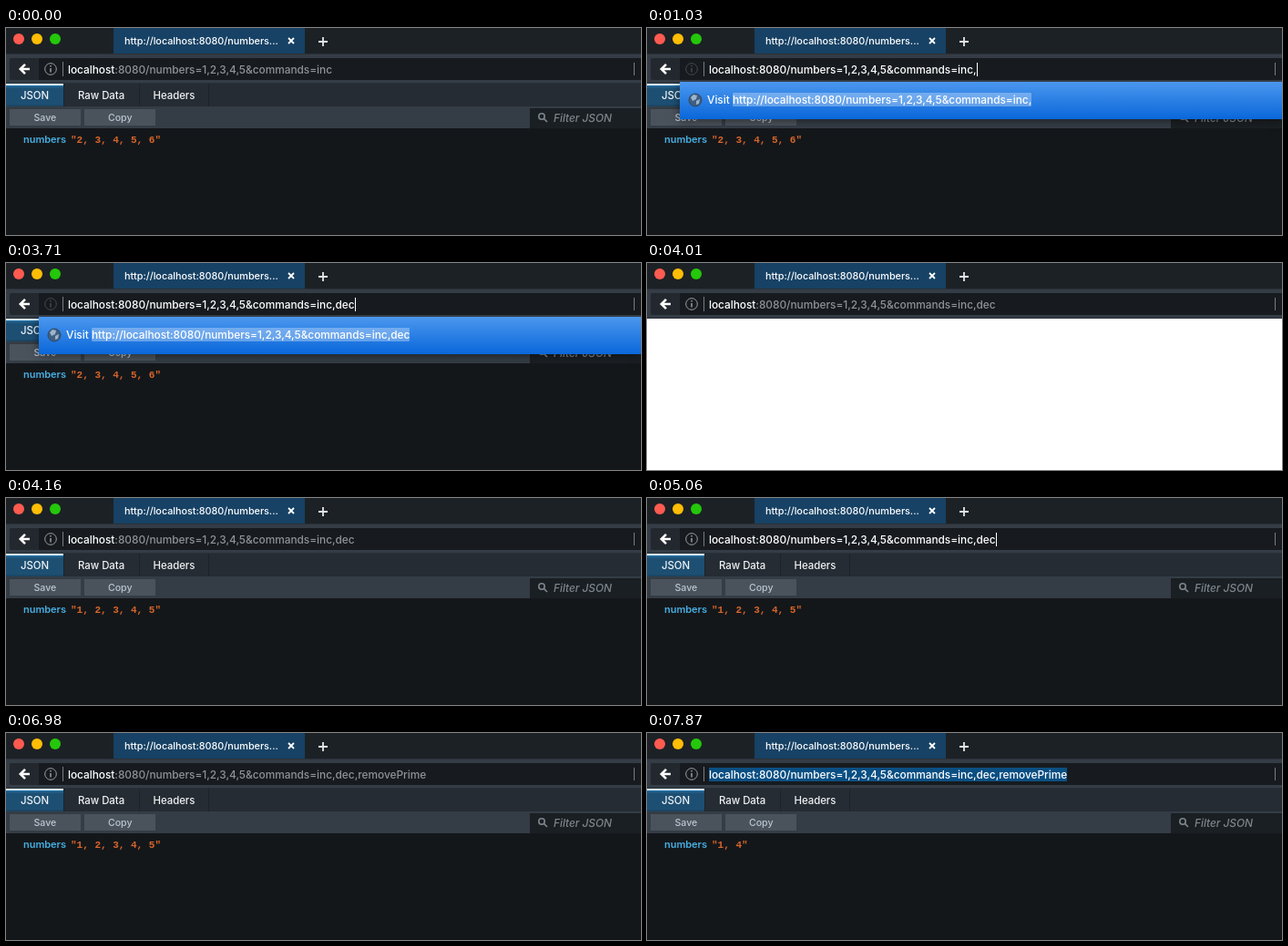
These frames come from a looping animation (697x227 px, 8 s). An HTML page:

```html
<!DOCTYPE html>
<html lang="en">
<head>
<meta charset="utf-8">
<title>Browser JSON viewer</title>
<style>
html, body { margin: 0; width: 100%; height: 100%; overflow: hidden; background: #14171a; }
body { position: relative; font: 500 11.88px/15px Inter, Roboto, sans-serif; letter-spacing: -.03px; font-variant-ligatures: none; color: #fff; }
p, div, svg { position: absolute; margin: 0; white-space: pre; }
svg { left: 0; top: 0; }

#tab { left: 118px; top: 0; width: 210px; height: 28px; background: #174265; }
#title { left: 130px; top: 7px; font-size: 10.85px; }
#titlebar { left: 0; top: 0; width: 100%; height: 28px; background: #1c2125; }
#nav { left: 0; top: 28px; width: 100%; height: 33px; background: #343c45; box-shadow: inset 0 1px #2a3037, inset 0 -1px #2a3037; }
#field { left: 36px; top: 33px; right: 0; height: 24px; background: #171b1f; }
#back { left: 4px; top: 33px; width: 32px; height: 24px; background: #22282e; border-radius: 2px 0 0 2px; }

#url { left: 68px; top: 38px; }
.idle #rest, .blank #rest { color: #8e9398; }
.selected #url span { background: #0a4f83; }
#caret { display: none; width: 1px; height: 15px; background: #fff; left: 100%; top: 0; }
.focus #caret, .typing #caret { display: block; }
.typing #info { opacity: .35; }

#tabs { left: 0; top: 61px; width: 100%; height: 25px; background: #252c33; }
#active { left: 0; top: 61px; width: 63px; height: 25px; background: #1d4f73;
  box-shadow: inset 0 2px #d7f1ff, inset 0 8px 3px -5px #2b82bf, inset 0 -2px rgba(0, 0, 0, .1); }
.menu { top: 67px; font-size: 11.4px; color: #f0f2f4; }
.line { top: 61px; width: 1px; height: 25px; background: #1d2329; }
#tools { left: 0; top: 86px; width: 100%; height: 24px; background: #343c45; }
.button { top: 89px; width: 78px; height: 18px; background: #4a525b; }
.label { top: 91px; font-size: 10.6px; color: #b9c6d2; }
#filter { left: 575px; top: 88px; right: 0; height: 22px; background: #1a1f23; }
#hint { left: 601px; top: 91px; font-style: italic; color: #7d858c; }
#key { left: 19px; top: 115px; font-size: 11px; font-weight: 600; color: #46afe3; }
#value { left: 71px; top: 116px; font: bold 11px/15px "Liberation Mono", monospace; letter-spacing: 0; color: #d96629; }
#blank { display: none; left: 0; top: 61px; width: 100%; bottom: 0; background: #fff; }
.blank #blank { display: block; }

#popup { display: none; left: 36px; top: 59px; right: 0; height: 41px; background: linear-gradient(#4b97ee, #0a67da);
  box-shadow: 0 1px 10px rgba(0, 0, 0, .5); clip-path: inset(0 0 -20px -20px); }
.typing #popup { display: block; }
#popup p { left: 30px; top: 12px; }
#popup span { position: absolute; left: 28px; background: rgba(255, 255, 255, .3); border-radius: 1px; }
</style>
</head>
<body>
<div id="titlebar"></div>
<div id="tab"></div>
<p id="title">http://localhost:8080/numbers...</p>
<div id="nav"></div>
<div id="field"></div>
<div id="back"></div>

<div id="tabs"></div>
<div id="active"></div>
<div class="line" style="left:63px"></div>
<div class="line" style="left:146px"></div>
<div class="line" style="left:222px"></div>
<p class="menu" style="left:16px">JSON</p>
<p class="menu" style="left:79px">Raw Data</p>
<p class="menu" style="left:161.5px">Headers</p>
<div id="tools"></div>
<div class="button" style="left:4px"></div>
<div class="button" style="left:86px"></div>
<p class="label" style="left:30.5px">Save</p>
<p class="label" style="left:112px">Copy</p>
<div id="filter"></div>
<p id="hint">Filter JSON</p>
<p id="key">numbers</p>
<p id="value"></p>

<svg width="697" height="227" fill="none">
  <circle cx="14" cy="12" r="6" fill="#ff5b50"/>
  <circle cx="34" cy="12" r="6" fill="#ffbd05"/>
  <circle cx="54" cy="12" r="6" fill="#24c70a"/>
  <path d="M310 11l6 6m0-6l-6 6" stroke="#fff" stroke-width="1.8"/>
  <path d="M343 15h10m-5-5v10" stroke="#e4e6e8" stroke-width="1.8"/>
  <path d="M26 45H16m5-5.2L15.8 45l5.2 5.2" stroke="#fff" stroke-width="2.6"/>
  <g id="info" stroke="#9a9fa4">
    <circle cx="49" cy="45" r="6.3"/>
    <path d="M49 44v4.5m0-7.5v1.6" stroke-width="1.5"/>
  </g>
  <path d="M62.5 37v16M689.5 38v14" stroke="#777d83"/>
  <g stroke="#7d858c" stroke-width="1.6">
    <circle cx="588" cy="97" r="3.2"/>
    <path d="M590.4 99.4l3.6 3.6"/>
  </g>
</svg>
<div id="blank"></div>

<div id="popup">
  <svg width="30" height="41" fill="none">
    <circle cx="17" cy="20" r="7" fill="#3f5f82" stroke="#344a63"/>
    <path d="M12 17l3-3 4 1-1 4-4 2zM18 21l4-2-1 5-3 1z" fill="#9db4cb"/>
  </svg>
  <p>Visit <span id="match"></span></p>
</div>
<p id="url"><span>localhost</span><span id="rest"></span><b id="caret" style="position:absolute"></b></p>

<script>
const LOOP = 8000;
const PATH = ':8080/numbers=1,2,3,4,5&commands=';
const KEY_DELAY = 148.6;
const $ = id => document.getElementById(id);

// Each step: start time, commands in the address, browser state, shown numbers
const steps = [];
const add = (time, commands, state, numbers) => steps.push([time, commands, state, numbers]);

// Key presses land on a 10 ms clock
const type = (start, stem, endings, numbers) => endings.forEach((end, i) =>
  add(Math.floor((start + i * KEY_DELAY) / 10) * 10, stem + end, 'typing', numbers));

const plusOne = '2, 3, 4, 5, 6', same = '1, 2, 3, 4, 5', filtered = '1, 4';

add(0, 'inc', 'idle', plusOne);
add(440, 'inc', 'selected', plusOne);
add(740, 'inc', 'focus', plusOne);
add(1030, 'inc,', 'typing', plusOne);
type(1630, 'inc,', ['m', 'mu', 'mul', 'mult', 'multi'], plusOne);
type(2520, 'inc,', ['mult', 'mul', 'mu', 'm', ''], plusOne);
type(3410, 'inc,', ['d', 'de', 'dec'], plusOne);
add(4010, 'inc,dec', 'blank', same);
add(4160, 'inc,dec', 'idle', same);
add(4760, 'inc,dec', 'selected', same);
add(5060, 'inc,dec', 'focus', same);
add(5350, 'inc,dec,', 'typing', same);
type(5790, 'inc,dec,', ['r', 're', 'remo', 'remove', 'removeP', 'removePr', 'removePrim', 'removePrime'], same);
add(6980, 'inc,dec,removePrime', 'idle', same);
add(7130, 'inc,dec,removePrime', 'idle', filtered);
add(7870, 'inc,dec,removePrime', 'selected', filtered);

let shown;
function draw(now) {
  const time = now % LOOP;
  const step = steps.findLast(([start]) => start <= time + 1);
  if (step !== shown) {
    const [, commands, state, numbers] = shown = step;
    document.body.className = state;
    $('rest').textContent = PATH + commands;
    $('match').textContent = 'http://localhost' + PATH + commands;
    $('value').textContent = `"${numbers}"`;
  }
  requestAnimationFrame(draw);
}
draw(0);
</script>
</body>
</html>
```
